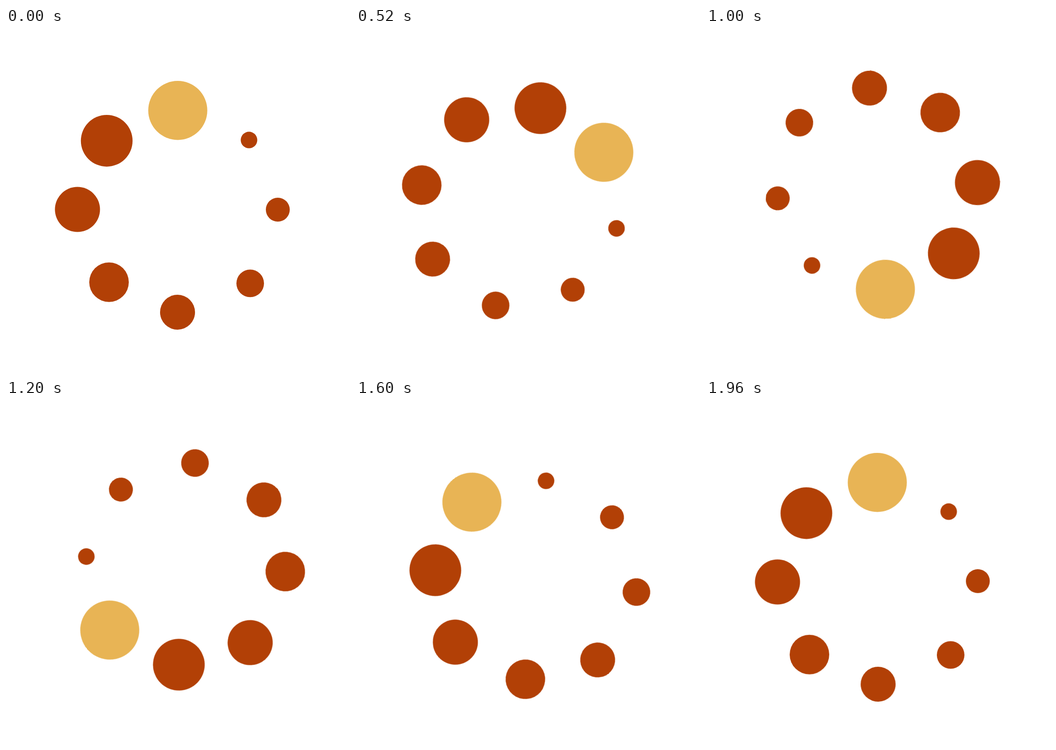
Recreate the animation shown at these times as an HTML page. Size 748 px wide and 748 px high, loop 2000 ms.

```html
<!DOCTYPE html>
<html lang="en">
<head>
<meta charset="utf-8">
<title>Loading ring</title>
<style>
  html, body { margin: 0; width: 100%; height: 100%; overflow: hidden; background: #fff; }
  svg { display: block; width: 748px; height: 748px; }
  #ring { transform-box: view-box; transform-origin: 374px 374px; fill: #b24006; }
  #ring .lead { fill: #e8b455; }
</style>
</head>
<body>
<svg viewBox="0 0 748 748">
  <g id="ring">
    <circle class="lead" cx="373.5" cy="179.2" r="64.2"/>
    <circle cx="528.4" cy="243.6" r="18"/>
    <circle cx="591" cy="395" r="26"/>
    <circle cx="531" cy="555.2" r="30"/>
    <circle cx="373" cy="618" r="38"/>
    <circle cx="224" cy="552.7" r="43"/>
    <circle cx="155.4" cy="394.6" r="49"/>
    <circle cx="219" cy="245.2" r="56.2"/>
  </g>
</svg>
<script>
  const DURATION = 2000;
  const STEPS = 50;   // shown poses per turn
  const TICKS = 59;   // finer clock the poses are taken from

  const smooth = x => x * x * (3 - 2 * x);

  function angle(step) {
    const tick = Math.max(0, Math.ceil(step * 6 / 5) - 1);
    return 360 * smooth(tick / TICKS);
  }

  // Each pose holds until the next one.
  const poses = Array.from({ length: STEPS + 1 }, (_, i) => ({
    offset: i / STEPS,
    transform: `rotate(${angle(i)}deg)`,
    easing: 'steps(1, end)'
  }));

  const spin = document.getElementById('ring')
    .animate(poses, { duration: DURATION, iterations: Infinity });
  spin.startTime = 0;
</script>
</body>
</html>
```
